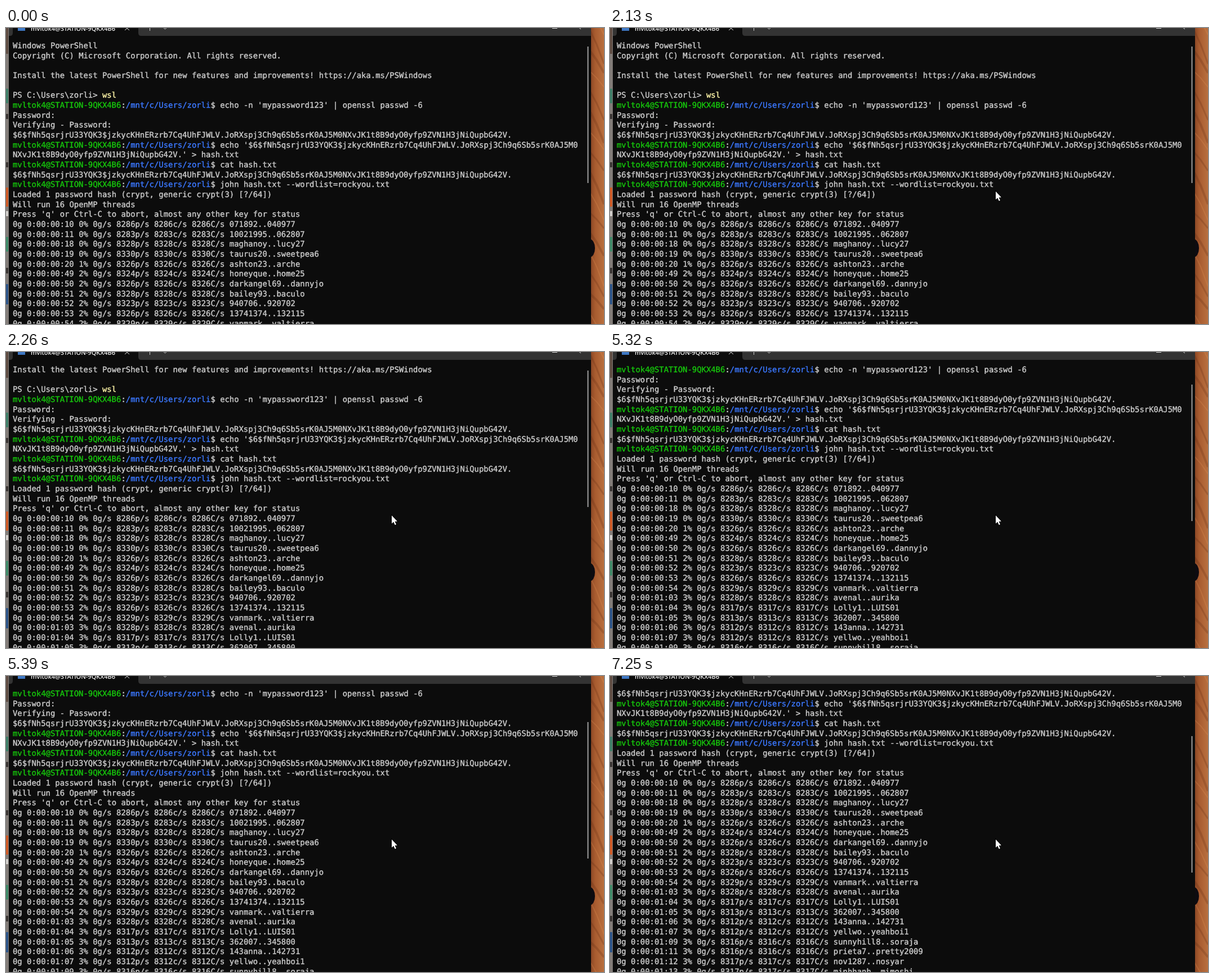
These frames come from a looping animation (1062 px wide and 527 px high, 8 s). An HTML page with a canvas:

```html
<!DOCTYPE html>
<html lang="en">
<head>
<meta charset="utf-8">
<title>Terminal session</title>
<style>
  html, body { margin: 0; width: 100%; height: 100%; overflow: hidden; background: #0c0c0c; }
  canvas { display: block; }
</style>
</head>
<body>
<canvas id="stage" width="1062" height="527"></canvas>
<script>
const ctx = document.getElementById('stage').getContext('2d');
const W = 1062, H = 527, LOOP = 8000;
const COLS = 120, CELL = 1004 / COLS, PITCH = 17.67;
const LEFT = 12, BASE = 36;
const GREY = '#cccccc', GREEN = '#16c60c', BLUE = '#3b78ff', YELLOW = '#f9f1a5';

const HOST = 'mvltok4@STATION-9QKX4B6';
const HASH = '$6$fNh5qsrjrU33YQK3$jzkycKHnERzrb7Cq4UhFJWLV.' +
  'JoRXspj3Ch9q6Sb5srK0AJ5M0NXvJK1t8B9dyO0yfp9ZVN1H3jNiQupbG42V.';

// A line is a list of [text, colour] runs.
const plain = text => [[text, GREY]];
const shell = command => [
  [HOST, GREEN], [':', GREY], ['/mnt/c/Users/zorli', BLUE], ['$ ' + command, GREY]
];
const status = entry => {
  const [time, percent, speed, range] = entry.split(' ');
  return plain(`0g 0:00:${time} ${percent}% 0g/s ${speed}p/s ${speed}c/s ${speed}C/s ${range}`);
};

const progress = [
  '00:10 0 8286 071892..040977',
  '00:11 0 8283 10021995..062807',
  '00:18 0 8328 maghanoy..lucy27',
  '00:19 0 8330 taurus20..sweetpea6',
  '00:20 1 8326 ashton23..arche',
  '00:49 2 8324 honeyque..home25',
  '00:50 2 8326 darkangel69..dannyjo',
  '00:51 2 8328 bailey93..baculo',
  '00:52 2 8323 940706..920702',
  '00:53 2 8326 13741374..132115',
  '00:54 2 8329 vanmark..valtierra',
  '01:03 3 8328 avenal..aurika',
  '01:04 3 8317 Lolly1..LUIS01',
  '01:05 3 8313 362007..345800',
  '01:06 3 8312 143anna..142731',
  '01:07 3 8312 yellwo..yeahboi1',
  '01:09 3 8316 sunnyhill8..soraja',
  '01:11 3 8316 prieta7..pretty2009',
  '01:12 3 8317 nov1287..nosyar',
  '01:13 3 8317 minhhanh..mimoshi'
];

const lines = [
  plain('Windows PowerShell'),
  plain('Copyright (C) Microsoft Corporation. All rights reserved.'),
  plain(''),
  plain('Install the latest PowerShell for new features and improvements! https://aka.ms/PSWindows'),
  plain(''),
  [['PS C:\\Users\\zorli> ', GREY], ['wsl', YELLOW]],
  shell("echo -n 'mypassword123' | openssl passwd -6"),
  plain('Password:'),
  plain('Verifying - Password:'),
  plain(HASH),
  shell(`echo '${HASH}' > hash.txt`),
  shell('cat hash.txt'),
  plain(HASH),
  shell('john hash.txt --wordlist=rockyou.txt'),
  plain('Loaded 1 password hash (crypt, generic crypt(3) [?/64])'),
  plain('Will run 16 OpenMP threads'),
  plain("Press 'q' or Ctrl-C to abort, almost any other key for status"),
  ...progress.map(status)
];

// Lay words out on the character grid, wrapping at the last column.
const words = [];
let row = 0;
for (const line of lines) {
  let col = 0;
  for (const [text, color] of line) {
    for (const part of text.match(/\S+|\s+/g) || []) {
      let rest = part;
      while (rest) {
        if (col === COLS) { col = 0; row++; }
        const piece = rest.slice(0, COLS - col);
        if (piece.trim()) words.push({ text: piece, color, col, row });
        col += piece.length;
        rest = rest.slice(piece.length);
      }
    }
  }
  row++;
}

function box(x, y, w, h, color) {
  ctx.fillStyle = color;
  ctx.fillRect(x, y, w, h);
}

function stroke(points, color, width = 1) {
  ctx.strokeStyle = color;
  ctx.lineWidth = width;
  ctx.beginPath();
  points.forEach(([x, y]) => ctx.lineTo(x, y));
  ctx.stroke();
}

function drawDesktop() {
  box(0, 0, 5, H, '#827c78');
  const patches = [
    [0, 46, '#5f4c42'], [108, 26, '#3f7f68'], [153, 9, '#3a3533'], [239, 9, '#3a3533'],
    [284, 34, '#cf5a26'], [326, 9, '#d0cdca'], [372, 26, '#3f8a68'], [427, 10, '#3a3533'],
    [456, 36, '#2c5488']
  ];
  for (const [y, h, color] of patches) box(0, y, 4, h, color);

  const wood = ctx.createLinearGradient(1038, 0, W, 0);
  wood.addColorStop(0, '#8a4624');
  wood.addColorStop(0.35, '#a85c30');
  wood.addColorStop(1, '#b9703f');
  box(1038, 0, W - 1038, H, wood);
  for (let i = 0; i < 16; i++) {
    const y = i * 36 - 30, run = 42 + 16 * Math.sin(i * 1.7);
    stroke([[1038, y], [1049, y + run * 0.4], [W, y + run]],
      i % 3 ? 'rgba(96,42,18,.25)' : 'rgba(226,146,86,.25)', 2 + i % 3);
  }
  ctx.fillStyle = '#0d0b10';
  ctx.beginPath();
  ctx.ellipse(1037, 392, 9, 16, 0, 0, Math.PI * 2);
  ctx.fill();
}

function drawWindow() {
  box(5, 0, 1034, H, '#0c0c0c');
  box(5, 0, 1034, 14, '#333333');
  ctx.fillStyle = '#0c0c0c';
  ctx.beginPath();
  ctx.moveTo(7, 14);
  ctx.quadraticCurveTo(12, 14, 12, 9);
  ctx.lineTo(12, 0);
  ctx.lineTo(235, 0);
  ctx.lineTo(235, 9);
  ctx.quadraticCurveTo(235, 14, 240, 14);
  ctx.fill();

  box(21, 0, 13, 5, '#3f78c4');
  ctx.font = '600 11px "Open Sans", "Noto Sans", sans-serif';
  ctx.fillStyle = '#f2f2f2';
  ctx.fillText(HOST, 44, 5);

  stroke([[211, -3], [219, 4]], '#dddddd');
  stroke([[219, -3], [211, 4]], '#dddddd');
  stroke([[255.5, 0], [255.5, 5]], '#cccccc');
  stroke([[279, -1], [282.5, 2], [286, -1]], '#cccccc');
  box(970, 0, 9, 1, '#dddddd');
  stroke([[1012, -5], [1021, 2]], '#dddddd');
}

function drawText(scroll) {
  ctx.save();
  ctx.beginPath();
  ctx.rect(5, 15, 1030, H);
  ctx.clip();
  ctx.font = '13.9px "DejaVu Sans Mono", monospace';
  ctx.lineWidth = 0.4;
  ctx.lineJoin = 'round';
  for (const { text, color, col, row } of words) {
    const line = row - scroll;
    if (line < 0 || line > 28) continue;
    const x = LEFT + col * CELL, y = BASE + line * PITCH;
    ctx.fillStyle = ctx.strokeStyle = color;
    ctx.fillText(text, x, y);
    ctx.strokeText(text, x, y);
  }
  ctx.restore();
}

// Pointer moves: start, step count, step length, from, to.
const moves = [
  { start: 270, steps: 12, gap: 71.8, from: [993, 514], to: [712, 322], ease: p => 1 - (1 - p) ** 2 },
  { start: 1130, steps: 2, gap: 60, from: [709, 319], to: [705, 315] },
  { start: 1390, steps: 3, gap: 70, from: [704, 314], to: [701, 311] },
  { start: 1920, steps: 4, gap: 70, from: [698, 307], to: [685, 291] }
];

function pointerAt(t) {
  const move = moves.filter(m => t >= m.start).pop();
  if (!move) return null;
  const { start, steps, gap, from, to, ease = p => p } = move;
  const step = Math.min(steps - 1, Math.floor((t - start) / gap));
  const p = ease(step / (steps - 1));
  return from.map((v, i) => Math.round(v + (to[i] - v) * p));
}

function drawPointer([x, y]) {
  ctx.beginPath();
  [[0, 0], [0, 14.5], [3.3, 11.5], [5.8, 17], [8, 16], [5.6, 10.7], [10, 10.4]]
    .forEach(([dx, dy]) => ctx.lineTo(x + dx, y + dy));
  ctx.closePath();
  ctx.strokeStyle = '#000000';
  ctx.lineWidth = 2;
  ctx.stroke();
  ctx.fillStyle = '#ffffff';
  ctx.fill();
}

// The scrollbar follows each wheel notch a moment after the text.
const notches = [2260, 5320, 7180];
const notchCount = t => notches.filter(n => t >= n).length;

function draw(t) {
  ctx.textRendering = 'geometricPrecision';
  drawDesktop();
  drawWindow();
  drawText(3 * notchCount(t));
  box(1032.5, Math.round(33 + 24.6 * notchCount(t - 70)), 2, 243, '#9d9d9d');
  const pointer = pointerAt(t);
  if (pointer) drawPointer(pointer);
}

const begin = performance.now();
function tick() {
  draw((performance.now() - begin) % LOOP);
  requestAnimationFrame(tick);
}
tick();
</script>
</body>
</html>
```
